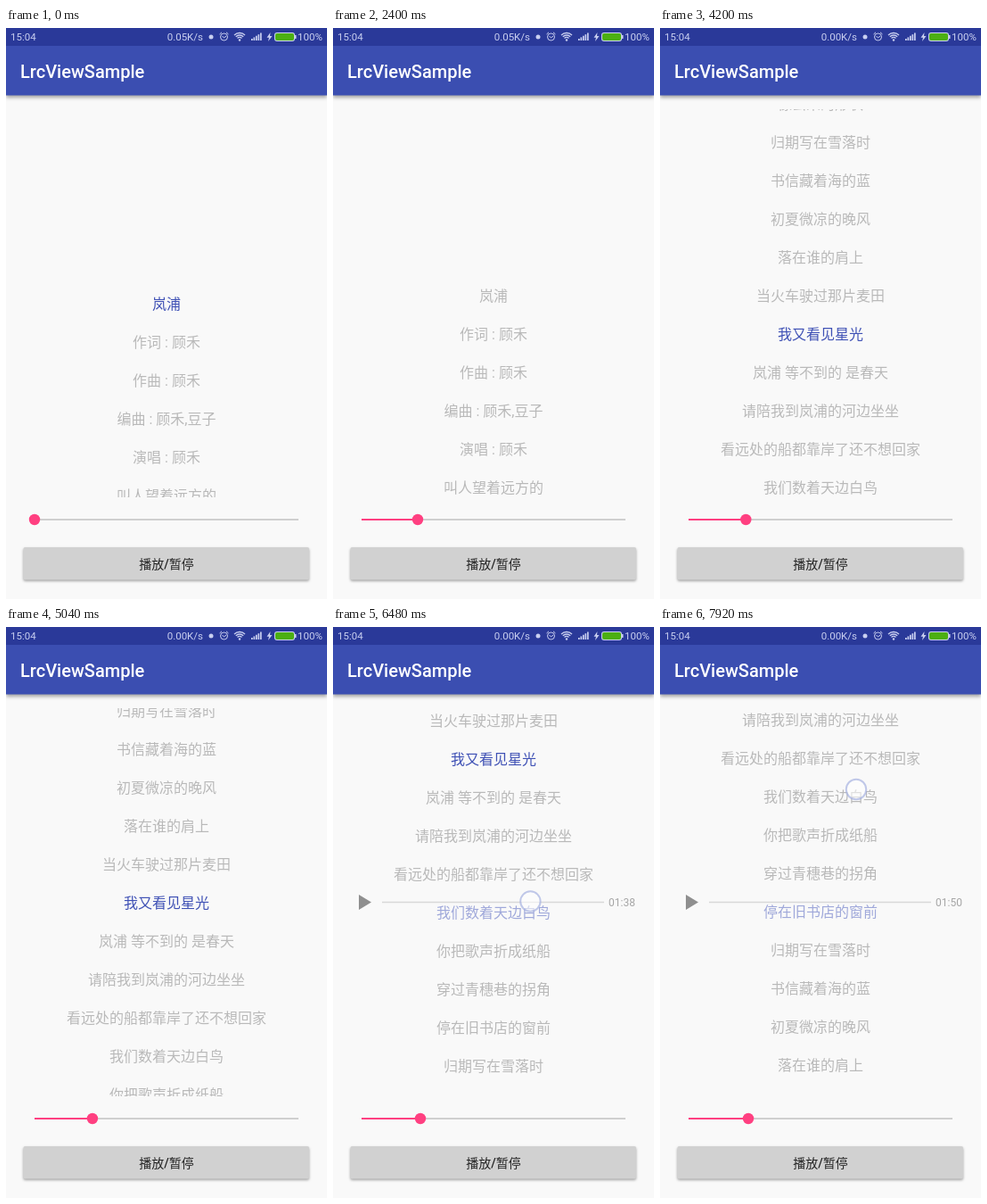
Animation, 360 px wide and 640 px high, one loop 8 s. Source, as an HTML page with a canvas:

```html
<!DOCTYPE html>
<html lang="zh-CN">
<head>
<meta charset="utf-8">
<title>LrcViewSample</title>
<style>
  html, body { margin: 0; width: 100%; height: 100%; overflow: hidden; background: #f9f9f9; }
  canvas { display: block; width: 360px; height: 640px; }
</style>
</head>
<body>
<canvas id="stage" width="360" height="640"></canvas>
<script>
const ctx = document.getElementById('stage').getContext('2d');
const LOOP = 8000, STEP = 120;
const FONT = 'Roboto, "Noto Sans CJK SC", "Noto Sans CJK", sans-serif';
const PINK = '#ff4081', BLUE = '#3f51b5', PALE = '#c9cff0';
const PITCH = 43, MID = 309;

const refrain = ['归期写在雪落时', '书信藏着海的蓝', '初夏微凉的晚风', '落在谁的肩上', '当火车驶过那片麦田'];
const lyrics = [
  '岚浦', '作词 : 顾禾', '作曲 : 顾禾', '编曲 : 顾禾,豆子', '演唱 : 顾禾',
  '叫人望着远方的', '不只窗外的船', '叫人迟迟难眠的', '还有一盏灯火', '山路究竟有多长',
  '风吹过旧屋檐', '谁在桥边轻声唱', '像云朵的形状', ...refrain,
  '我又看见星光', '岚浦 等不到的 是春天', '请陪我到岚浦的河边坐坐', '看远处的船都靠岸了还不想回家',
  '我们数着天边白鸟', '你把歌声折成纸船', '穿过青穗巷的拐角', '停在旧书店的窗前', ...refrain
];
// Start times in seconds of the lines from FIRST on
const FIRST = 18, starts = [71, 78, 85, 92, 98, 102, 106, 110];

const SEEK = 2388, NEXT = 3990, DRAG = 5850;

const clamp = u => Math.max(0, Math.min(1, u));
const part = (t, a, b) => clamp((t - a) / (b - a));
const mix = (a, b, u) => a + (b - a) * u;
const smooth = u => u * u * (3 - 2 * u);

function scrollAt(t) {
  if (t < NEXT) return 17 * PITCH * part(t, SEEK, SEEK + 1000);
  if (t < DRAG) return mix(17 * PITCH, 18 * PITCH, part(t, NEXT, NEXT + 1000));
  if (t < 7080) return mix(789, 1024.5, 1 - Math.pow(1 - part(t, 5880, 7080), 1.4));
  return mix(1024.5, 1065, part(t, 7080, 7920));
}

function thumbAt(t) {
  return t < SEEK ? mix(32, 95, smooth(part(t, 480, 1320))) : 95 + (t - SEEK) * 0.00073;
}

function touchAt(t) {
  if (t >= 360 && t < SEEK - 40) return [thumbAt(t), 550];
  if (t < 5600) return null;
  if (t < DRAG) return [227, mix(466, 456, part(t, 5600, DRAG))];
  if (t < 7080) {
    const u = (scrollAt(t) - 789) / 235.5;
    return [mix(227, 218, u), mix(451, 220, u)];
  }
  const u = part(t, 7080, 7920);
  return [mix(218, 220, u), mix(220, 182, u)];
}

function text(str, x, y, size, color, align = 'left', weight = 400) {
  ctx.font = `${weight} ${size}px ${FONT}`;
  ctx.textAlign = align;
  ctx.fillStyle = color;
  ctx.fillText(str, x, y);
}

function rect(x, y, w, h, color, r = 0) {
  ctx.fillStyle = color;
  ctx.beginPath();
  ctx.roundRect(x, y, w, h, r);
  ctx.fill();
}

function disc(x, y, r, color) {
  ctx.fillStyle = color;
  ctx.beginPath();
  ctx.arc(x, y, r, 0, Math.PI * 2);
  ctx.fill();
}

function arc(x, y, r, from, to, color, width) {
  ctx.strokeStyle = color;
  ctx.lineWidth = width;
  ctx.beginPath();
  ctx.arc(x, y, r, from, to);
  ctx.stroke();
}

function poly(points, color, fill) {
  ctx.beginPath();
  points.forEach(p => ctx.lineTo(...p));
  if (fill) {
    ctx.fillStyle = color;
    ctx.fill();
  } else {
    ctx.strokeStyle = color;
    ctx.lineWidth = 1;
    ctx.stroke();
  }
}

function withShadow(blur, dy, alpha, draw) {
  ctx.save();
  ctx.shadowColor = `rgba(0,0,0,${alpha})`;
  ctx.shadowBlur = blur;
  ctx.shadowOffsetY = dy;
  draw();
  ctx.restore();
}

function statusBar(t) {
  rect(0, 0, 360, 20, '#2a3999');
  text('15:04', 5, 14, 11.5, PALE);
  text(t < 3600 ? '0.05K/s' : '0.00K/s', 221, 14, 11.5, PALE, 'right');
  disc(230, 10, 2.5, PALE);

  // Alarm clock
  arc(244.5, 10, 4, 0, Math.PI * 2, PALE, 1);
  poly([[242.5, 9], [244.5, 11], [247, 9]], PALE);
  poly([[239.5, 7], [242, 4.8]], PALE);
  poly([[247, 4.8], [249.5, 7]], PALE);

  // Wireless and signal strength
  for (const r of [3.5, 6, 8.5]) arc(262, 14, r, Math.PI * 1.25, Math.PI * 1.75, PALE, 1.3);
  disc(262, 13.5, 1.2, PALE);
  for (let i = 0; i < 5; i++) rect(275 + i * 2.5, 12 - i * 1.6, 1.7, 2 + i * 1.6, PALE);

  // Charging battery
  poly([[296.5, 5], [292.5, 10.7], [295, 10.7], [294, 15], [298.5, 9], [296, 9]], PALE, true);
  rect(301, 5, 23, 10, PALE, 3);
  rect(302, 6, 21, 8, '#4caf12', 2);
  rect(324, 8, 1.5, 4, PALE);
  text('100%', 327, 14, 11.5, PALE);
}

function header(t) {
  withShadow(4, 2, 0.35, () => rect(0, 0, 360, 75.5, '#3b4eb1'));
  statusBar(t);
  text('LrcViewSample', 16, 55.5, 20, '#fff', 'left', 500);
}

function lyricView(t) {
  const scroll = scrollAt(t);
  const current = t < SEEK ? 0 : t < NEXT ? 17 : 18;
  const dragging = t >= DRAG;
  const picked = dragging ? Math.round(scroll / PITCH) : -1;

  if (dragging) {
    poly([[29, 300], [43, 308.5], [29, 317]], '#8f8f8f', true);
    rect(55, 307.7, 249, 1.6, '#d8d8d8');
    const s = starts[picked - FIRST];
    const two = n => String(n).padStart(2, '0');
    text(`${two(Math.floor(s / 60))}:${two(s % 60)}`, 339, 313, 12, '#a6a6a6', 'right');
  }

  ctx.save();
  ctx.beginPath();
  ctx.rect(0, 91, 360, 435);
  ctx.clip();
  lyrics.forEach((line, i) => {
    const y = MID + i * PITCH - scroll;
    if (y < 75 || y > 545) return;
    const color = i === current ? BLUE : i === picked ? '#9fa8da' : '#b9b9b9';
    text(line, 180, y + 6, 16, color, 'center');
  });
  ctx.restore();
}

function controls(t) {
  const x = thumbAt(t);
  rect(32, 550, 296, 2, '#cfcfcf');
  rect(32, 550, x - 32, 2, PINK);
  disc(x, 551, 6.2, PINK);
  withShadow(3, 1.5, 0.35, () => rect(19.5, 582, 320.5, 36.5, '#d1d1d1', 2));
  text('播放/暂停', 180, 605.5, 14, '#222', 'center', 500);
}

function touch(t) {
  const p = touchAt(t);
  if (!p) return;
  disc(...p, 11, 'rgba(255,255,255,0.55)');
  arc(...p, 11.2, 0, Math.PI * 2, 'rgba(160,172,222,0.65)', 2);
}

function draw(t) {
  rect(0, 0, 360, 640, '#f9f9f9');
  lyricView(t);
  controls(t);
  header(t);
  touch(t);
}

const begin = performance.now();
function tick() {
  const t = (performance.now() - begin) % LOOP;
  draw(Math.floor(t / STEP) * STEP);
  requestAnimationFrame(tick);
}
tick();
</script>
</body>
</html>
```
